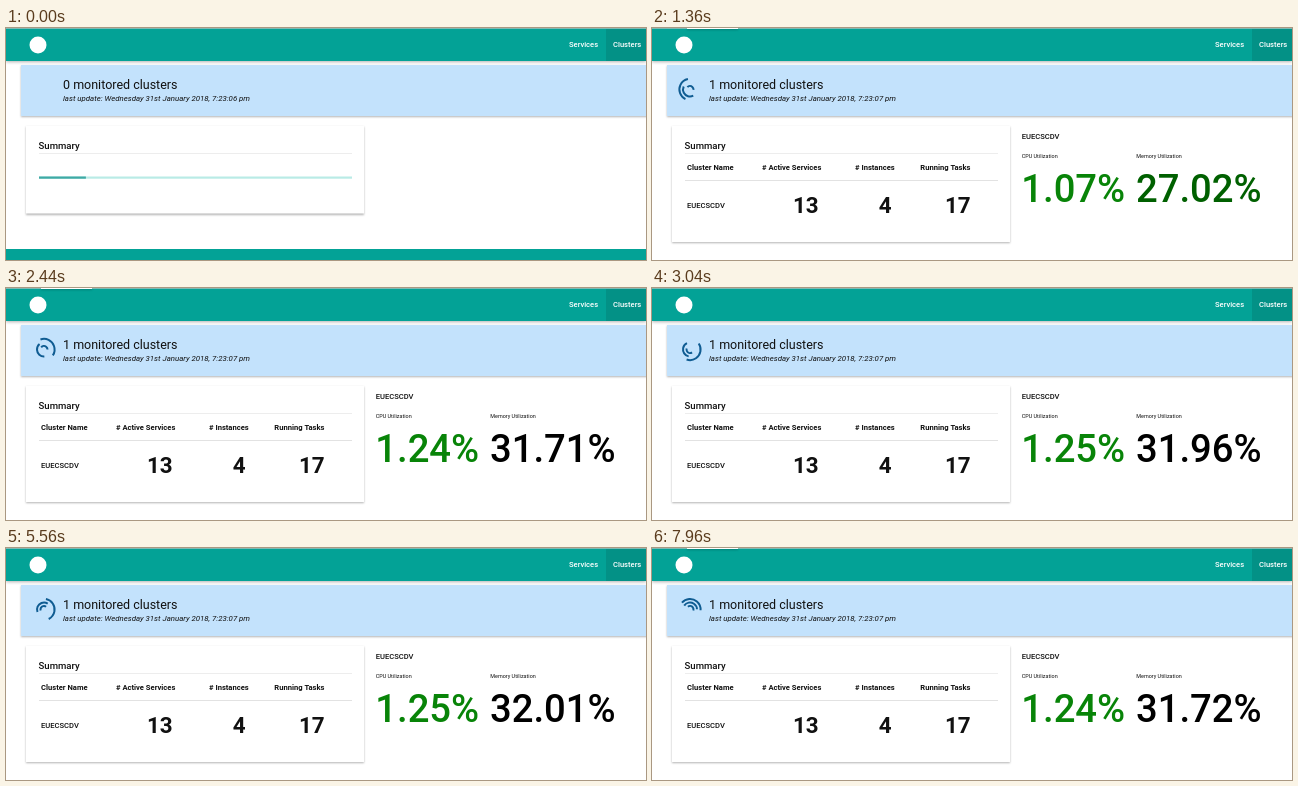
Animation, 640 px wide and 232 px high, one loop 8 s. Source, as an HTML page with a canvas:

```html
<!DOCTYPE html>
<html lang="en">
<head>
<meta charset="utf-8">
<title>Cluster monitor</title>
<style>
html, body { margin: 0; width: 100%; height: 100%; overflow: hidden; background: #fff; }
canvas { display: block; width: 640px; height: 232px; }
</style>
</head>
<body>
<canvas id="stage" width="640" height="232"></canvas>
<script>
const ctx = document.getElementById('stage').getContext('2d');
const LOOP = 8;
const LOADED = 0.6;
const REFRESH = 7.2;
const TEAL = '#03a296';
const clamp = v => Math.max(0, Math.min(1, v));

function rect(x, y, w, h, color) {
  ctx.fillStyle = color;
  ctx.fillRect(x, y, w, h);
}

function raised(x, y, w, h, color, blur = 2) {
  ctx.save();
  ctx.shadowColor = 'rgba(0,0,0,.3)';
  ctx.shadowBlur = blur;
  ctx.shadowOffsetY = 1;
  rect(x, y, w, h, color);
  ctx.restore();
}

function text(str, x, y, size, weight = 400, color = '#111', style = 'normal') {
  ctx.font = `${style} ${weight} ${size}px Roboto, sans-serif`;
  ctx.fillStyle = color;
  ctx.fillText(str, x, y);
}

// Cubic bezier easing, solved by bisection
function bezier(x1, y1, x2, y2, x) {
  const at = (a, b, s) => 3 * a * s * (1 - s) ** 2 + 3 * b * s * s * (1 - s) + s ** 3;
  let lo = 0, hi = 1;
  for (let i = 0; i < 24; i++) {
    const mid = (lo + hi) / 2;
    if (at(x1, x2, mid) < x) lo = mid; else hi = mid;
  }
  return at(y1, y2, lo);
}

// Exponential ease-out counter
function count(from, to, start, t) {
  const p = clamp((t - start) / 2.744);
  return from + (to - from) * (1 - 2 ** (-10 * p)) * 1024 / 1023;
}

function header() {
  raised(0, 0, 640, 33, TEAL, 3);
  rect(600, 0, 40, 33, '#039186');
  rect(0, 0, 640, 1, '#7fb9b4');
  ctx.fillStyle = '#fff';
  ctx.beginPath();
  ctx.arc(32, 17, 8.5, 0, 7);
  ctx.fill();
  text('Services', 563, 19, 7.6, 500, '#fff');
  text('Clusters', 607, 19, 7.6, 500, '#fff');
}

function banner(clusters, second) {
  raised(15, 37, 630, 51, '#c3e2fc');
  text(`${clusters} monitored clusters`, 57, 61, 12.5);
  text(`last update: Wednesday 31st January 2018, 7:23:0${second} pm`,
    57, 72.5, 7.85, 400, '#111', 'italic');
}

function summaryCard(height) {
  raised(20, 98, 338, height, '#fff');
  text('Summary', 32.5, 121, 9.6, 500);
  rect(33, 125, 313, 1, '#ededed');
}

function progress(t) {
  const x = 33, w = 313;
  const p = bezier(0.65, 0.815, 0.735, 0.395, clamp((t + 0.08) / 1.26));
  const left = clamp(-0.35 + 1.35 * p);
  const right = clamp(1.9 * p);
  rect(x, 148.5, w, 2.2, '#b9ebe6');
  rect(x + w * left, 148.5, w * (right - left), 2.2, '#3fa9a5');
}

function spinner(t) {
  const rings = [[10.6, 125], [7, 23], [3.5, 329]];
  ctx.save();
  ctx.globalAlpha = clamp((t - LOADED) / 0.45);
  ctx.translate(38, 61.5);
  ctx.strokeStyle = '#0f5c92';
  ctx.lineWidth = 2;
  for (const [radius, speed] of rings) {
    const angle = (212 + speed * (t - 0.84) - 90) * Math.PI / 180;
    ctx.beginPath();
    ctx.arc(0, 0, radius, angle - 1.25, angle + 1.25);
    ctx.stroke();
  }
  ctx.restore();
}

function table() {
  const columns = [
    ['Cluster Name', 35], ['# Active Services', 110],
    ['# Instances', 203], ['Running Tasks', 268.3]
  ];
  for (const [label, x] of columns) text(label, x, 142, 7.6, 700);
  rect(33, 152, 313, 1, '#e2e2e2');
  text('EUECSCDV', 35, 179.5, 7.6, 500);
  text('13', 141, 185, 22.4, 700);
  text('4', 226.7, 185, 22.4, 700);
  text('17', 293, 185, 22.4, 700);
}

function usage(t) {
  const cpu = t < REFRESH ? count(0, 1.254, 0.613, t) : count(1.254, 1.237, REFRESH, t);
  const memory = t < REFRESH ? count(0, 32.0052, 0.6266, t) : count(32.0052, 31.67, REFRESH, t);
  const green = Math.round(130 * (1 - clamp(t - 1.1)));
  text('EUECSCDV', 369.7, 111, 7.6, 500);
  text('CPU Utilization', 369.7, 129.7, 5.45);
  text('Memory Utilization', 484.3, 129.7, 5.45);
  text(cpu.toFixed(2) + '%', 369.3, 174.3, 38.2, 500, '#088408');
  text(memory.toFixed(2) + '%', 484, 174.3, 38.2, 500, `rgb(0,${green},0)`);
}

function draw(t) {
  rect(0, 0, 640, 232, '#fff');
  const loaded = t >= LOADED;
  header();
  banner(loaded ? 1 : 0, loaded ? 7 : 6);
  summaryCard(loaded ? 116 : 87.5);
  if (loaded) {
    if (t < 2.6 || t > 7.7) raised(35, 0, t < 1 ? 67 : 51, 1, '#fff');
    spinner(t);
    table();
    usage(t);
  } else {
    progress(t);
    rect(0, 221, 640, 11, TEAL);
  }
}

function frame(now) {
  draw(now / 1000 % LOOP);
  requestAnimationFrame(frame);
}
draw(0);
requestAnimationFrame(frame);
</script>
</body>
</html>
```
